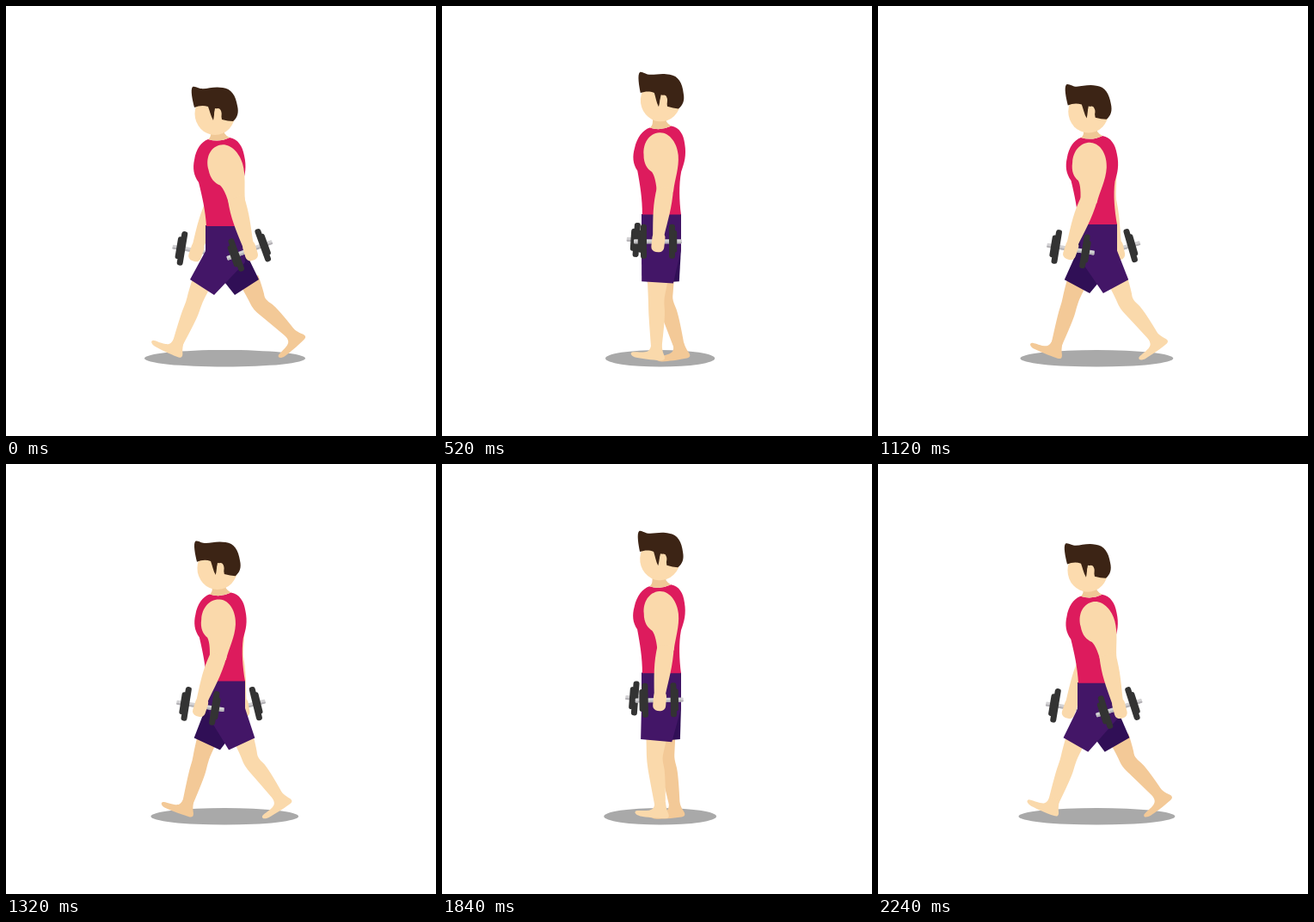
An HTML page with a canvas that plays this animation: 500 px wide and 500 px high, repeating every 2.28 s.

```html
<!DOCTYPE html>
<html lang="en">
<head>
<meta charset="utf-8">
<title>Walking with dumbbells</title>
<style>
html, body { margin: 0; width: 100%; height: 100%; overflow: hidden; background: #fff; }
canvas { display: block; width: 500px; height: 500px; }
</style>
</head>
<body>
<canvas id="stage"></canvas>
<script>
const LOOP = 2280, TURN = 1200, STEP = 40;
const SKIN = '#fad9ab', SKIN_FAR = '#f3c997', NECK = '#f0c896', FACE = '#fcdbae';
const HAIR = '#3c2415', SHIRT = '#dd1b5d', SHORTS = '#431667', SHORTS_FAR = '#300f56';
const PLATE = '#333333', BAR = '#d3d2d4', BAR_SHADE = '#b4b2b6', SHADOW = '#a9a9a9';

const UPPER_ARM = new Path2D('M0-21C12-21 20-7 20 7C20 22 14 34 11 49L-8 49C-8 38-9 29-12 24C-17 20-21 14-20 3C-20-10-12-21 0-21Z');
const FOREARM = new Path2D('M-8-3C-11 18-9 32-7 54L6 54C8 36 12 20 11-4Z');
const FOOT = new Path2D('M-6-6C-7 2-9 3-13 4C-20 5-25 4-28 5C-31 7-28 10-23 11C-15 12-6 13 6 13C11 13 11 10 9 6Q7 2 6-6Z');
const TORSO = new Path2D('M235 155Q248 159 260 153C270 155 275 163 277 174C280 187 278 196 275 206C273 222 275 240 278 256L233 256C232 238 228 221 224 205C218 197 217 188 219 179C221 166 227 158 235 155Z');
const COLLAR = new Path2D('M238 138L253 138L254 148Q256 151 260 153Q248 159 235 155Q238 153 238 149Z');
const HAIR_CAP = new Path2D('M217 94C219 93 222 95 226 96C234 97 241 93 252 95C262 96 267 104 269 116C271 124 269 130 264 134Q258 134 251 132L249 120L243 119C242 124 242 129 241 133C238 128 237 122 235 117C229 115 224 116 219 118C217 110 214 97 217 94Z');

const canvas = document.getElementById('stage');
const ctx = canvas.getContext('2d');
const ratio = window.devicePixelRatio || 1;
canvas.width = canvas.height = 500 * ratio;

const radians = degrees => degrees * Math.PI / 180;

function fill(path, color) {
  ctx.fillStyle = color;
  ctx.fill(path);
}

function oval(x, y, rx, ry, color) {
  ctx.fillStyle = color;
  ctx.beginPath();
  ctx.ellipse(x, y, rx, ry, 0, 0, Math.PI * 2);
  ctx.fill();
}

function bar(x, y, w, h, color, r) {
  ctx.fillStyle = color;
  ctx.beginPath();
  ctx.roundRect(x - w / 2, y - h / 2, w, h, r);
  ctx.fill();
}

function place(x, y, degrees, draw) {
  ctx.save();
  ctx.translate(x, y);
  ctx.rotate(radians(degrees));
  draw();
  ctx.restore();
}

function below(x, y, degrees, length) {
  const a = radians(degrees);
  return [x - Math.sin(a) * length, y + Math.cos(a) * length];
}

function dumbbell() {
  bar(-0.5, 0, 56, 5, BAR, 1);
  bar(-0.5, 1.5, 56, 2, BAR_SHADE, 1);
  for (const side of [-1, 1]) {
    bar(side * 20 - 1, 0, 5.5, 26, PLATE, 2.7);
    bar(side * 16.5 - 0.5, 0, 7, 40, PLATE, 3);
  }
}

// In all limbs s is the leg's swing: 1 fully forward, 0 upright, -1 fully back.
// Each arm moves against the leg on its own side.
function arm(s) {
  const bend = s * s;
  const shoulder = [253.7 + 4.7 * s - 4.5 * bend, 166 + 16 * Math.abs(s)];
  const upper = -3 - 10 * s - 3 * bend;
  const fore = 8.5 - 17.8 * s - 7.3 * bend;
  const grip = 2 - 14.7 * s - 7.3 * bend;
  const elbow = below(...shoulder, upper, 46);
  place(...below(...elbow, fore, 60), grip, dumbbell);
  place(...shoulder, upper, () => fill(UPPER_ARM, SKIN));
  place(...elbow, fore, () => {
    fill(FOREARM, SKIN);
    bar(0, 61, 15, 23, SKIN, 6);
  });
}

function smoothSide(points) {
  const last = points.length - 1;
  ctx.lineTo(...points[0]);
  for (let i = 1; i < last; i++) {
    const [x, y] = points[i], next = points[i + 1];
    const end = i === last - 1 ? next : [(x + next[0]) / 2, (y + next[1]) / 2];
    ctx.quadraticCurveTo(x, y, ...end);
  }
}

function leg(s, lifted, color) {
  // A lifted foot trails behind the knee.
  const reach = s - (lifted ? 0.15 * (1 - Math.abs(s)) : 0);
  const kx = 254 - 38 * s + 2 * s * s, ky = 341 + 3 * Math.abs(s);
  const ax = 258 - 67 * reach + 8 * reach * reach;
  const ay = 399 - (reach > 0 ? 5 : 16) * reach * reach;
  const tilt = reach * (reach > 0 ? 21 : 45);
  const hx = 255 + (kx - 255) * 0.7;
  const spine = [
    [hx, 318, 12],
    [kx + (hx - kx) * 0.3, ky - 8, 10],
    [kx, ky + 3, 9],
    [kx + (ax - kx) * 0.35 + 1, ky + (ay - ky) * 0.35, 9.7],
    [ax, ay, 6]
  ];
  const outline = side => spine.map(([x, y, w], i) => {
    const [x0, y0] = spine[Math.max(0, i - 1)];
    const [x1, y1] = spine[Math.min(4, i + 1)];
    const d = Math.hypot(x1 - x0, y1 - y0);
    return [x + side * w * (y1 - y0) / d, y - side * w * (x1 - x0) / d];
  });
  ctx.beginPath();
  smoothSide(outline(-1));
  smoothSide(outline(1).reverse());
  ctx.fillStyle = color;
  ctx.fill();
  place(ax, ay, tilt, () => fill(FOOT, color));
}

function shorts(s, color) {
  const front = Math.max(0, s), back = Math.max(0, -s), e = Math.abs(s);
  const waist = 240 + 15 * e;
  const cx = 254 - 26 * s, cy = 320.5 + 6.5 * e;
  const hw = 19 - 5 * e, hh = 9 * s;
  ctx.beginPath();
  ctx.moveTo(232, waist);
  ctx.lineTo(278 - 2 * front, waist);
  ctx.lineTo(278, 281 + 17 * front + 4 * back);
  ctx.lineTo(cx + hw, cy + hh);
  ctx.lineTo(cx - hw, cy - hh);
  ctx.lineTo(232 + 7 * back, 281 + 4 * front + 21 * back);
  ctx.fillStyle = color;
  ctx.fill();
}

function body(rise) {
  const lean = 0.075 * rise;
  ctx.save();
  ctx.transform(1, 0, -lean, 1, 255 * lean, -15.5 * rise);
  fill(TORSO, SHIRT);
  fill(COLLAR, NECK);
  ctx.restore();
  place(244 + 13.3 * rise, 122 - 18 * rise, 3.5 * rise, () => {
    ctx.translate(-244, -122);
    oval(243, 125, 23.5, 25, FACE);
    fill(HAIR_CAP, HAIR);
    oval(246.5, 125.5, 4.2, 6.5, FACE);
  });
}

function draw(time) {
  const goingBack = time < TURN;
  const s = goingBack ? 1 - 2 * time / TURN : 2 * (time - TURN) / (LOOP - TURN) - 1;
  const rise = 1 - Math.abs(s);

  ctx.setTransform(ratio, 0, 0, ratio, 0, 0);
  ctx.fillStyle = '#fff';
  ctx.fillRect(0, 0, 500, 500);
  oval(254.5 - rise, 409.7, 93.5 - 34.5 * rise, 9.8, SHADOW);

  arm(-s);
  leg(-s, goingBack, SKIN_FAR);
  shorts(-s, SHORTS_FAR);
  leg(s, !goingBack, SKIN);
  shorts(s, SHORTS);
  body(rise);
  arm(s);
}

const start = performance.now();
function tick() {
  const time = (performance.now() - start) % LOOP;
  draw(Math.floor(time / STEP) * STEP);
  requestAnimationFrame(tick);
}
tick();
</script>
</body>
</html>
```
